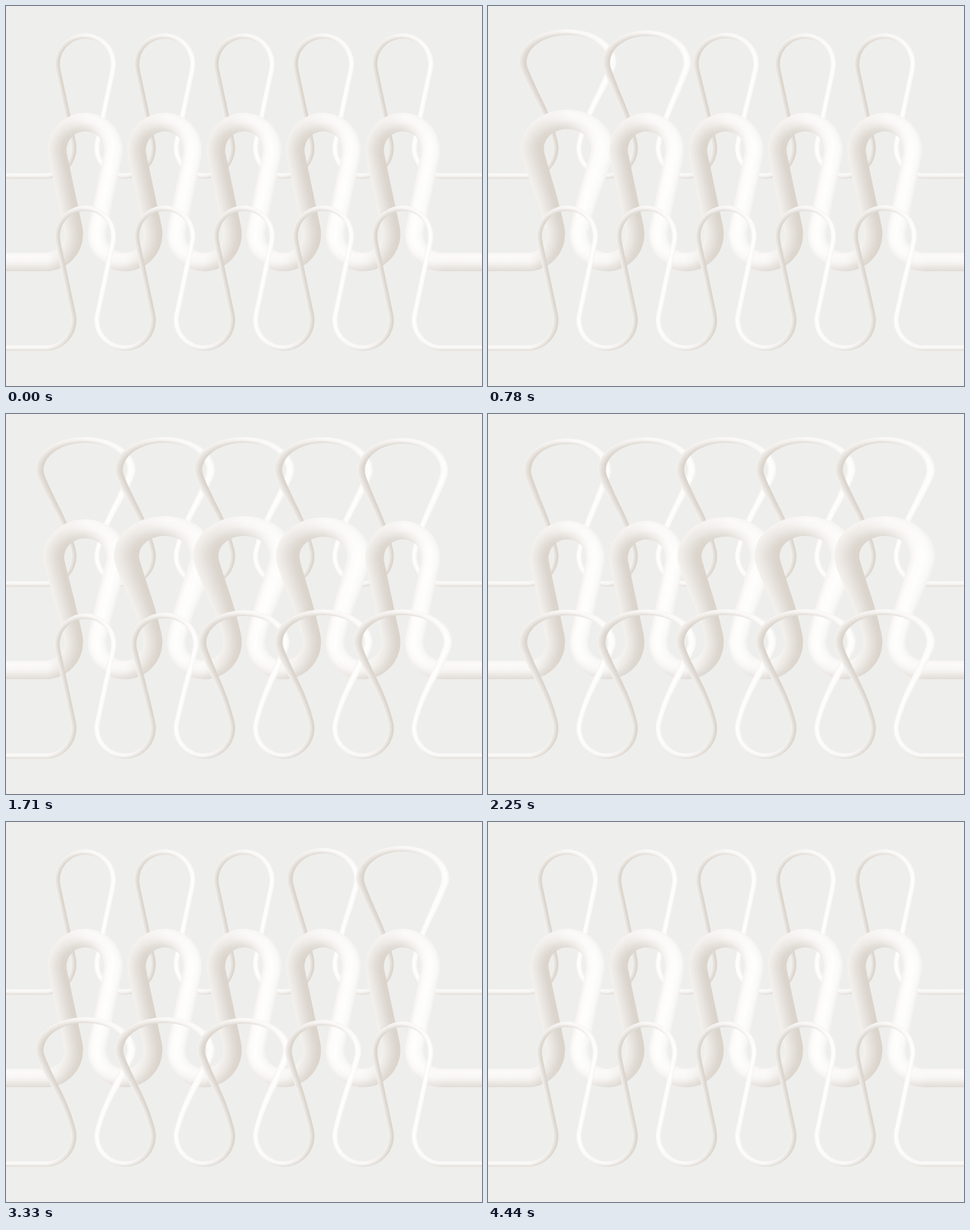
An HTML page with a canvas for the animation above (4500 ms loop, 720 by 576 pixels).

```html
<!DOCTYPE html>
<html lang="en">
<head>
<meta charset="utf-8">
<title>Knit</title>
<style>
  html, body { margin: 0; width: 100%; height: 100%; overflow: hidden; background: #eeeeec; }
  canvas { display: block; width: 720px; height: 576px; }
</style>
</head>
<body>
<canvas id="stage" width="720" height="576"></canvas>
<script>
const ctx = document.getElementById('stage').getContext('2d');
const LOOP = 4500, COLS = 5, PITCH = 120, R = 42.5, DROP = 127;
const clamp = v => Math.max(0, Math.min(1, v));
const mix = (a, b, t) => a + (b - a) * t;

// cubic-bezier(.25, .1, .25, 1), solved by bisection
function ease(x) {
  if (x <= 0) return 0;
  if (x >= 1) return 1;
  const curve = (a, b, s) => 3 * a * s * (1 - s) ** 2 + 3 * b * s * s * (1 - s) + s ** 3;
  let lo = 0, hi = 1;
  for (let i = 0; i < 24; i++) {
    const mid = (lo + hi) / 2;
    if (curve(.25, .25, mid) < x) lo = mid; else hi = mid;
  }
  return curve(.1, 1, lo);
}

// Tube shading from the left to the right of the yarn's direction
const STOPS = [0, .2, .5, .78, 1];
const RISING = [[245, 242, 238], [238, 234, 230], [228, 223, 217], [219, 213, 205], [217, 211, 203]];
const LEVEL = [[248, 247, 245], [251, 250, 249], [248, 246, 244], [235, 231, 227], [224, 219, 213]];
const FALLING = [[243, 242, 240], [250, 250, 248], [254, 254, 253], [253, 252, 251], [245, 243, 240]];
function shades(ty) {
  const limb = ty < 0 ? RISING : FALLING;
  return STOPS.map((_, i) =>
    `rgb(${LEVEL[i].map((v, c) => Math.round(mix(v, limb[i][c], Math.abs(ty)))).join()})`);
}

// Centre line of one row; y = 0 is the centre of the upper arcs
function buildYarn() {
  const pts = [];
  const add = (x, y, tx, ty) => pts.push({
    x, y, tx, ty,
    col: Math.max(0, Math.min(COLS - 1, Math.round(x / PITCH) - 1)),
    colors: shades(ty)
  });
  const lineTo = (x, y) => {
    const p = pts[pts.length - 1];
    const len = Math.hypot(x - p.x, y - p.y), n = Math.ceil(len / 3);
    const tx = (x - p.x) / len, ty = (y - p.y) / len;
    for (let i = 1; i < n; i++) add(mix(p.x, x, i / n), mix(p.y, y, i / n), tx, ty);
  };
  const arc = (cx, cy, from, to) => {
    const n = Math.ceil(Math.abs(to - from) * R / 3), dir = Math.sign(to - from);
    for (let i = 0; i <= n; i++) {
      const a = mix(from, to, i / n), c = Math.cos(a), s = Math.sin(a);
      add(cx + R * c, cy + R * s, -s * dir, c * dir);
    }
  };
  const half = PITCH / 2;
  const tilt = Math.atan2(DROP, half) - Math.acos(2 * R / Math.hypot(half, DROP));
  const PI = Math.PI;

  add(-10, DROP + R, 1, 0);
  lineTo(half, DROP + R);
  arc(half, DROP, PI / 2, -tilt);
  for (let k = 1; k <= COLS; k++) {
    const cx = k * PITCH, low = cx + half;
    lineTo(cx - R * Math.cos(tilt), R * Math.sin(tilt));
    arc(cx, 0, PI - tilt, 2 * PI + tilt);
    lineTo(low - R * Math.cos(tilt), DROP - R * Math.sin(tilt));
    arc(low, DROP, PI + tilt, k < COLS ? -tilt : PI / 2);
  }
  lineTo(730, DROP + R);
  add(730, DROP + R, 1, 0);
  return pts;
}
const yarn = buildYarn();

const even = (first, step) => k => first + step * k;
const pulse = (t, start, rise, end, fall) =>
  Math.min(ease((t - start) / rise), ease((end - t) / fall));

const rows = [
  { y: 88, width: 8, swell: .64, start: even(90, 290), rise: () => 1000,
    end: even(2640, 300), fall: 1000, order: k => k },
  { y: 218.5, width: 28, swell: .365, start: even(500, 300), rise: () => 700,
    end: even(1820, 345), fall: 500, order: k => k },
  { y: 349, width: 8, swell: .64, start: k => [640, 880, 1210, 1580, 1690][k],
    rise: k => [1500, 1200, 1100, 900, 900][k],
    end: even(3275, 290), fall: 1000, order: k => COLS - 1 - k }
];

// Widens a loop around its axis, fading out towards its foot
function warp(row, p, side, amp) {
  const x = p.x + p.ty * side, y = p.y - p.tx * side;
  const cx = (p.col + 1) * PITCH;
  const u = clamp((DROP + 1 - y) / (DROP + 1));
  const scale = 1 + row.swell * amp * u * u * (3 - 2 * u);
  const lift = 7.2 * amp * clamp((45 - y) / 100);
  return [cx + (x - cx) * scale, row.y + y - lift];
}

function drawRow(row, t) {
  const amps = Array.from({ length: COLS }, (_, col) => {
    const k = row.order(col);
    return pulse(t, row.start(k), row.rise(k), row.end(k), row.fall);
  });
  const h = row.width / 2;
  const edges = yarn.map(p => [warp(row, p, h, amps[p.col]), warp(row, p, -h, amps[p.col])]);
  const past = (a, b) => [mix(a[0], b[0], 1.15), mix(a[1], b[1], 1.15)];

  for (let i = 0; i < yarn.length - 1; i++) {
    const [l0, r0] = edges[i], [l1, r1] = edges[i + 1];
    const fill = ctx.createLinearGradient(
      (l0[0] + l1[0]) / 2, (l0[1] + l1[1]) / 2, (r0[0] + r1[0]) / 2, (r0[1] + r1[1]) / 2);
    STOPS.forEach((s, j) => fill.addColorStop(s, yarn[i].colors[j]));
    ctx.fillStyle = fill;
    ctx.beginPath();
    ctx.moveTo(...l0);
    ctx.lineTo(...past(l0, l1));
    ctx.lineTo(...past(r0, r1));
    ctx.lineTo(...r0);
    ctx.fill();
  }
}

function draw(t) {
  ctx.fillStyle = '#eeeeec';
  ctx.fillRect(0, 0, 720, 576);
  rows.forEach(row => drawRow(row, t));
}

const began = performance.now();
function tick() {
  draw((performance.now() - began) % LOOP);
  requestAnimationFrame(tick);
}
tick();
</script>
</body>
</html>
```
